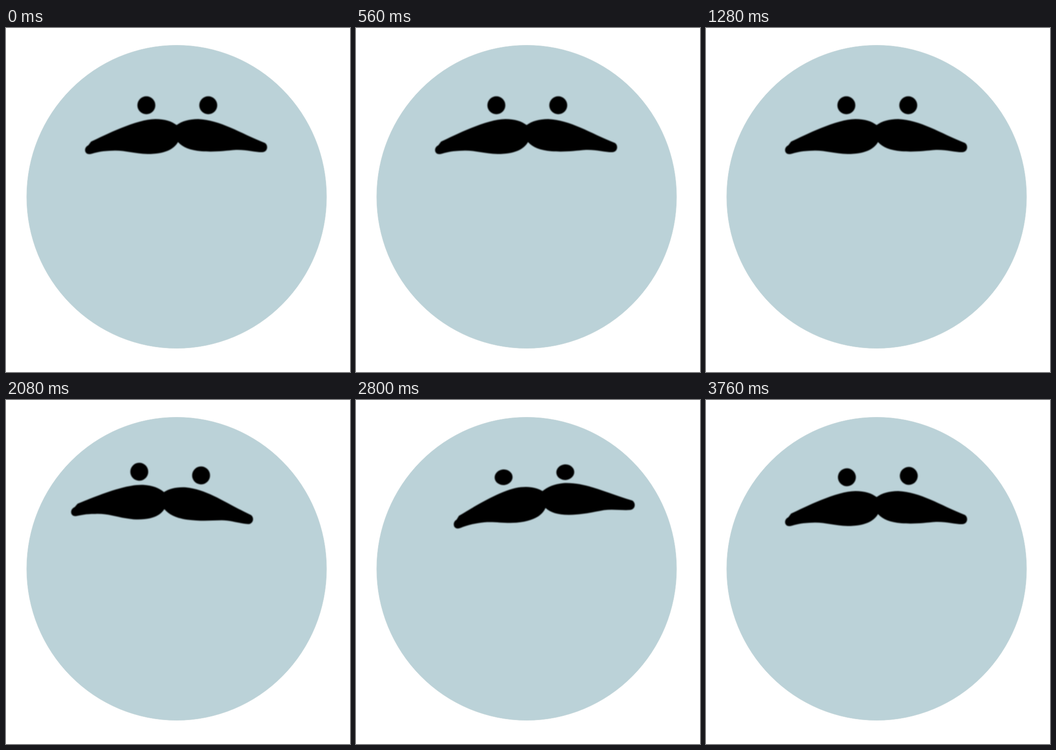
Animation, 748 px wide and 748 px high, one loop 3.92 s. Source, as an HTML page:

```html
<!DOCTYPE html>
<html lang="en">
<head>
<meta charset="utf-8">
<title>Moustache face</title>
<style>
  html, body { margin: 0; width: 100%; height: 100%; overflow: hidden; background: #fff; }
  svg { display: block; width: 100%; height: 100%; }
</style>
</head>
<body>
<svg viewBox="0 0 748 748">
  <filter id="soft"><feGaussianBlur stdDeviation="1.1"/></filter>
  <ellipse cx="371" cy="367" rx="326" ry="329.5" fill="#bbd2d8" stroke="#c8d9dc"/>
  <g filter="url(#soft)">
    <g id="eyes" fill="#020406">
      <ellipse cx="-67.3" rx="19.5" ry="19.5"/>
      <ellipse cx="67.3" rx="19.5" ry="19.5"/>
    </g>
    <path id="moustache" d="M185 247 C215 233 284 198 325 198 C346 198 360 203 371 211
      C382 203 398 198 418 198 C466 200 508 228 563 250 C571 255 569 270 557 270
      C540 270 520 264 500 265 C475 267 455 270 425 268 C400 266 384 259 374 248
      C365 264 345 274 308 274 C275 273 255 264 225 267 C205 268 195 271 184 274
      C170 277 168 260 179 255 Z"/>
  </g>
</svg>
<script>
const LOOP = 3920, TICK = 80, POSE = 100;
const eyes = document.getElementById('eyes');
const moustache = document.getElementById('moustache');

// Smooth rise from 0 to 1 between two poses.
function ramp(pose, from, to) {
  const u = Math.min(1, Math.max(0, (pose - from) / (to - from)));
  return u * u * (3 - 2 * u);
}

// Short bump that peaks at a pose.
const bump = (pose, peak, width) => ramp(pose, peak - width, peak) - ramp(pose, peak, peak + width);

function draw(now) {
  // Poses last 100 ms but are shown on an 80 ms clock, so some are held twice.
  const time = Math.floor((now % LOOP) / TICK) * TICK;
  const pose = Math.round(time / POSE);

  const stretch = bump(pose, 3, 2.5);
  const blink = bump(pose, 28, 2);
  const turn = ramp(pose, 22, 28);
  const left = ramp(pose, 18, 21) - turn;
  const right = turn - ramp(pose, 33, 37);
  const eyesRight = turn - ramp(pose, 33, 39); // the eyes settle last

  const x = 369.5 - 30.5 * left + 39.5 * right - 1.5 * stretch;
  const y = 262.5 - 11 * left - 13 * right;
  const tilt = 3.3 * left - 5.5 * right;
  moustache.setAttribute('transform',
    `translate(${x} ${y}) rotate(${tilt}) translate(-369.5 -262.5)
     translate(0 198) scale(1 ${1 + 0.16 * stretch}) translate(0 -198)`);

  const eyeX = 372.5 + 15.5 * (eyesRight - left);
  const eyeY = 168 - 8 * left - 5.5 * Math.sqrt(eyesRight) - 2 * stretch;
  const eyeTilt = 3.4 * left - 4.7 * Math.sqrt(eyesRight);
  eyes.setAttribute('transform', `translate(${eyeX} ${eyeY}) rotate(${eyeTilt})`);
  for (const eye of eyes.children) {
    eye.setAttribute('ry', 19.5 + 1.5 * stretch - 2.5 * blink);
  }
}

const start = performance.now();
function frame() {
  draw(performance.now() - start);
  requestAnimationFrame(frame);
}
frame();
</script>
</body>
</html>
```
